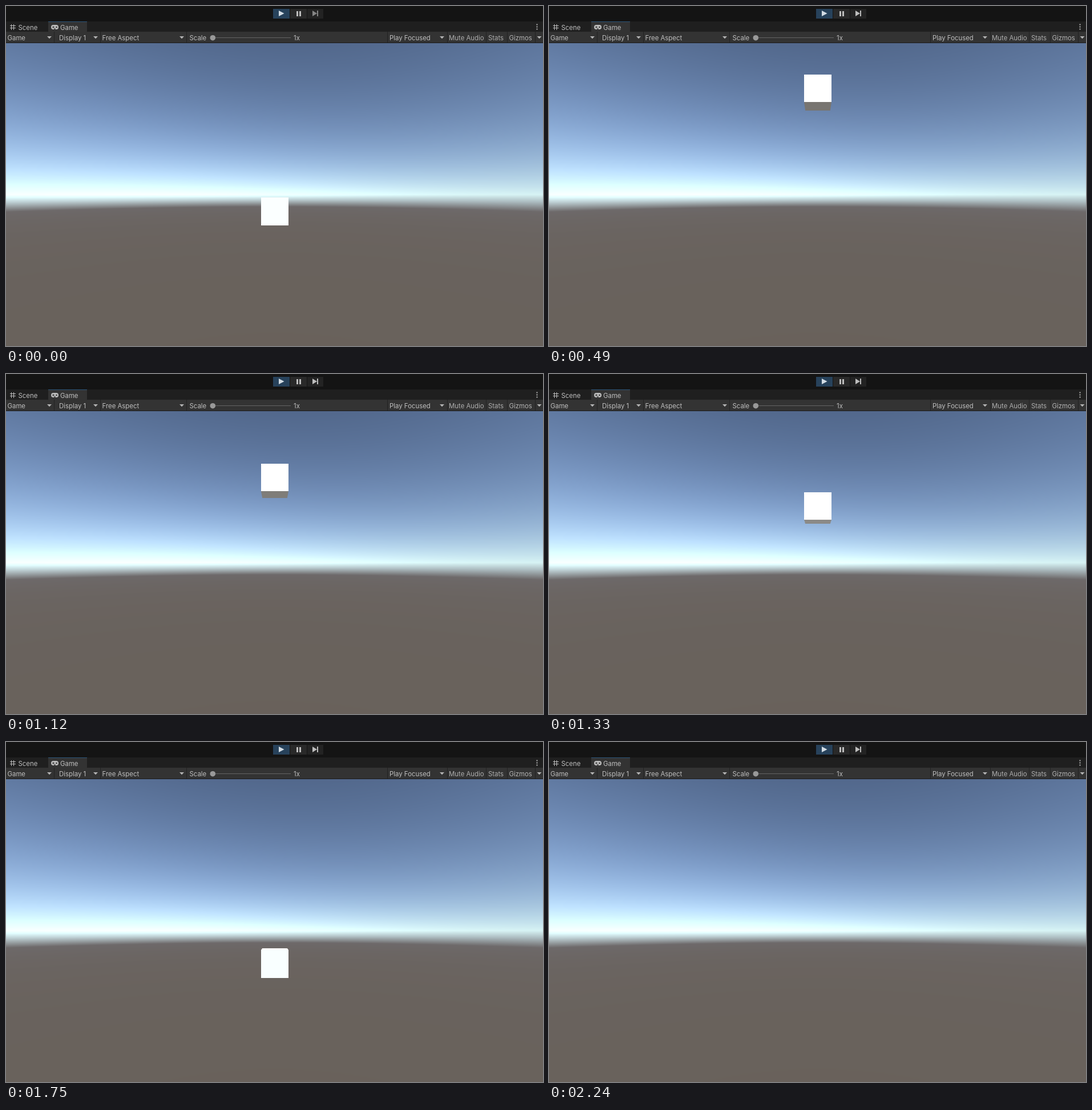
These frames come from a looping animation (941x595 px, 2370 ms). An HTML page with a canvas:

```html
<!DOCTYPE html>
<html lang="en">
<head>
<meta charset="utf-8">
<title>Cube jump</title>
<style>
  html, body { margin: 0; width: 100%; height: 100%; overflow: hidden; background: #141414; }
  canvas { display: block; }
</style>
</head>
<body>
<canvas id="stage" width="941" height="595"></canvas>
<script>
const W = 941, H = 595, VIEW_TOP = 65;
const CX = 471, CY = 330;            // centre of the game view
const FOCAL = 459;                   // 60 degree field of view
const LOOP = 2370, STEP = 70, LAST = 32;
const FONT = '11.4px Inter, "Liberation Sans", sans-serif';
const ctx = document.getElementById('stage').getContext('2d');

const clamp = (v, lo, hi) => Math.min(hi, Math.max(lo, v));
const mix = (a, b, t) => a + (b - a) * t;
const rgb = c => `rgb(${c.map(Math.round).join(',')})`;

// ---- Sky: single scattering in a thin atmosphere ----
const SUN = [0.321, 0.766, -0.557];
const INV_WAVE = [0.65, 0.57, 0.475].map(w => w ** -4);
const GROUND = [0.369, 0.349, 0.341].map(c => c * c);
const RAYLEIGH = 0.0025, MIE = 0.001, SUN_POWER = 20, EXPOSURE = 1.3;
const CAM_H = 0.0001, HORIZON_BLEND = 0.046;
const ABSORB = INV_WAVE.map(w => 4 * Math.PI * (w * RAYLEIGH + MIE));

function opticalScale(cos) {
  const x = 1 - cos;
  return 0.25 * Math.exp(-0.00287 + x * (0.459 + x * (3.83 + x * (-6.8 + x * 5.25))));
}

function skyColor(x, y, z) {
  const far = Math.sqrt(0.050625 + y * y) - y;
  const start = Math.exp(-160 * CAM_H) * opticalScale(y);
  const len = far / 2, sum = [0, 0, 0];
  for (let i = 0; i < 2; i++) {
    const d = len * (i + 0.5);
    const px = x * d, py = 1 + CAM_H + y * d, pz = z * d;
    const h = Math.hypot(px, py, pz);
    const depth = Math.exp(160 * (1 - h));
    const light = (SUN[0] * px + SUN[1] * py + SUN[2] * pz) / h;
    const view = (x * px + y * py + z * pz) / h;
    const scatter = clamp(start + depth * (opticalScale(light) - opticalScale(view)), 0, 50);
    for (let c = 0; c < 3; c++) sum[c] += Math.exp(-scatter * ABSORB[c]) * depth * len * 40;
  }
  const dot = SUN[0] * x + SUN[1] * y + SUN[2] * z;
  const phase = 0.75 + 0.75 * dot * dot;
  return sum.map((v, c) => Math.sqrt(EXPOSURE * phase * v * INV_WAVE[c] * RAYLEIGH * SUN_POWER));
}

function groundColor(y) {
  const far = CAM_H / Math.max(0.001, -y);
  const camScale = opticalScale(-y), sunScale = opticalScale(SUN[1]);
  const depth = Math.exp(-160 * CAM_H / 2);
  const scatter = clamp(depth * (sunScale + camScale) - camScale * Math.exp(-4 * CAM_H), 0, 50);
  return GROUND.map((g, c) => {
    const fade = Math.exp(-scatter * ABSORB[c]);
    const haze = fade * depth * far * 20 * SUN_POWER * (INV_WAVE[c] * RAYLEIGH + MIE);
    return Math.sqrt(EXPOSURE * (haze + g * fade));
  });
}

function paintSky(g) {
  const img = g.createImageData(W, H - VIEW_TOP);
  let p = 0;
  for (let j = VIEW_TOP; j < H; j++) {
    for (let i = 0; i < W; i++) {
      const dx = i + 0.5 - CX, dy = CY - j - 0.5;
      const n = Math.hypot(dx, dy, FOCAL);
      const x = dx / n, y = dy / n, z = FOCAL / n;
      const t = clamp(-y / HORIZON_BLEND, 0, 1);
      const sky = t < 1 ? skyColor(x, Math.max(0, y), z) : null;
      const land = t > 0 ? groundColor(Math.min(y, -0.02)) : null;
      for (let c = 0; c < 3; c++) {
        const v = !land ? sky[c] : !sky ? land[c] : mix(sky[c], land[c], t);
        img.data[p++] = v * 255;
      }
      img.data[p++] = 255;
    }
  }
  g.putImageData(img, 0, VIEW_TOP);
}

// ---- Editor bars ----
function rect(g, x, y, w, h, color) {
  g.fillStyle = color;
  g.fillRect(x, y, w, h);
}

function poly(g, color, ...pts) {
  g.fillStyle = color;
  g.beginPath();
  pts.forEach(([x, y]) => g.lineTo(x, y));
  g.fill();
}

function dot(g, x, y, r, color) {
  g.fillStyle = color;
  g.beginPath();
  g.arc(x, y, r, 0, 7);
  g.fill();
}

function label(g, text, x, y, color = '#bebebe') {
  g.fillStyle = color;
  g.fillText(text, x, y);
}

const arrow = (g, x) => poly(g, '#b4b4b4', [x - 4, 53], [x + 4, 53], [x, 57.2]);

function paintBars(g) {
  g.font = FONT;
  rect(g, 0, 0, W, 27, '#141414');
  rect(g, 0, 27, W, 18, '#1f1f1f');
  rect(g, 0, 45, W, 19, '#333333');
  rect(g, 0, 64, W, 1, '#1c1c1c');

  rect(g, 468, 5, 29, 17, '#27425b');
  rect(g, 498, 5, 29, 17, '#292929');
  rect(g, 528, 5, 28, 17, '#232323');
  poly(g, '#d3dce4', [478, 8], [487.5, 13], [478, 18]);
  rect(g, 509, 9, 3, 9, '#bdbdbd');
  rect(g, 514, 9, 3, 9, '#bdbdbd');

  rect(g, 74, 27, 68, 18, '#333333');
  rect(g, 74, 27, 68, 1, '#2c557a');
  for (const d of [0, 4]) {
    rect(g, 9 + d, 32, 1, 10, '#bcbcbc');
    rect(g, 7, 34 + d, 10, 1, '#bcbcbc');
  }
  label(g, 'Scene', 21.5, 41.5);

  g.fillStyle = '#bcbcbc';
  g.beginPath();
  g.roundRect(79, 33, 13, 8, 4);
  g.fill();
  rect(g, 84.5, 39, 2, 2, '#333333');
  rect(g, 81, 36.5, 4, 1, '#333333');
  rect(g, 82.5, 35, 1, 4, '#333333');
  dot(g, 88.5, 37, 1.3, '#333333');
  label(g, 'Game', 95, 41.5);
  for (const y of [32.5, 36.5, 40.5]) rect(g, 929.5, y - 1, 2, 2, '#b8b8b8');

  label(g, 'Game', 2.5, 59.5);
  label(g, 'Display 1', 93, 59.5);
  label(g, 'Free Aspect', 168.5, 59.5);
  label(g, 'Scale', 321.5, 59.5);
  label(g, '1x', 504, 59.5);
  label(g, 'Play Focused', 672, 59.5);
  label(g, 'Mute Audio', 776, 59.5, '#adadad');
  label(g, 'Stats', 845, 59.5, '#adadad');
  label(g, 'Gizmos', 881.5, 59.5, '#b4b4b4');
  for (const x of [76, 157, 308, 764, 934.5]) arrow(g, x);
  for (const x of [84, 165, 316, 668, 773, 841, 878, 927]) rect(g, x, 45, 1, 19, '#222222');
  rect(g, 362, 55, 137, 1, '#646464');
  dot(g, 362.3, 55.7, 4.8, '#999999');
}

function stepIcon(color) {
  poly(ctx, color, [537, 8], [545, 13], [537, 18]);
  rect(ctx, 545, 8, 2, 10, color);
}

// ---- Cube: thrown up at 10 units/s, fixed steps of 0.02 s ----
function heightAt(frame) {
  const k = frame ? Math.floor(18.75 + frame * 10 / 3) : 2;
  return 0.2 * k - 0.001962 * k * (k + 1);
}

function drawCube(h) {
  const near = FOCAL / 9.5, back = FOCAL / 10.5;
  const row = (y, s) => Math.round(CY - s * (y - 1));
  const top = row(h + 0.5, near), base = row(h - 0.5, near);
  const l = 447, r = 495, bl = CX - back / 2, br = CX + back / 2;

  if (h < 0.5) {
    const edge = row(h + 0.5, back);
    poly(ctx, '#ffffff', [l, top], [bl, edge], [br, edge], [r, top]);
  }
  if (h > 1.5) {
    const d = h - 1.5, edge = row(h - 0.5, back);
    const grey = 127 - (d - 2.6) * 9, haze = Math.exp(-2 * d);
    const color = [mix(grey, 195, haze), mix(grey - 3, 235, haze), mix(grey - 7, 255, haze)];
    poly(ctx, rgb(color), [l, base], [bl, edge], [br, edge], [r, base]);
  }
  rect(ctx, l, top, r - l, base - top, rgb([255 - clamp((top - 280) / 14, 0, 10), 255, 255]));
}

// ---- Loop ----
const back = document.createElement('canvas');
back.width = W;
back.height = H;
const bg = back.getContext('2d');
paintSky(bg);
paintBars(bg);

function draw(now) {
  const frame = Math.min(LAST, Math.floor((now % LOOP) / STEP));
  ctx.drawImage(back, 0, 0);
  stepIcon(frame ? '#bdbdbd' : '#858585');
  drawCube(heightAt(frame));
}

let start = null;
function tick(now) {
  if (start === null) start = now;
  draw(now - start);
  requestAnimationFrame(tick);
}
draw(0);
requestAnimationFrame(tick);
</script>
</body>
</html>
```
